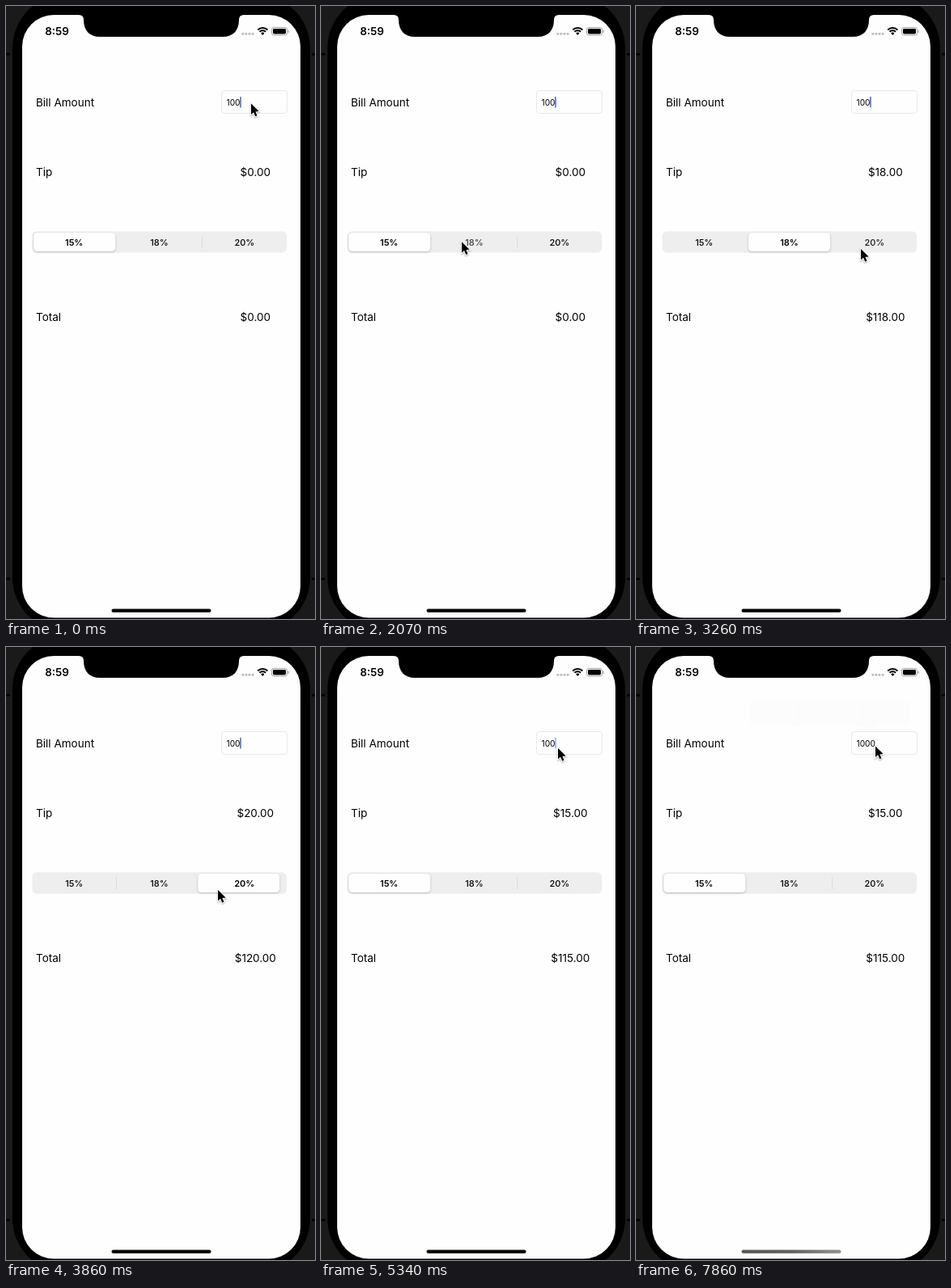
These frames come from a looping animation (382x757 px, 8000 ms). An HTML page with a canvas:

```html
<!DOCTYPE html>
<html lang="en">
<head>
<meta charset="utf-8">
<title>Tip calculator</title>
<style>
  html, body { margin: 0; width: 100%; height: 100%; overflow: hidden; background: #000; }
  canvas { display: block; width: 382px; height: 757px; }
</style>
</head>
<body>
<canvas id="stage"></canvas>
<script>
const W = 382, H = 757, LOOP = 8000, STEP = 148.3;
const PAPER = '#fefefe';
const canvas = document.getElementById('stage');
const ctx = canvas.getContext('2d');
const dpr = window.devicePixelRatio || 1;
canvas.width = W * dpr;
canvas.height = H * dpr;

// Pointer tip: step, x, y
const POINTER = [
  [2, 303, 120.5], [4, 286, 145], [6, 235, 205], [8, 184, 258], [10, 165.5, 274.5],
  [12, 173, 290], [14, 175, 292.5], [16, 178, 293], [18, 215, 297], [20, 271, 300],
  [22, 285, 300], [24, 284, 300], [26, 262, 300], [28, 162, 296], [30, 104, 292],
  [31, 101, 292], [32, 104, 291], [33, 130, 268], [34, 205, 178], [35, 281, 94.5],
  [36, 293, 125], [38, 294, 124], [41, 296, 122.5]
];
// Segment taps: release step, chosen segment
const TAPS = [[14, 1], [23, 2], [31, 0]];
// Label dimming while pressed: segment, centre step, depth
const PRESSES = [[1, 14, 0.5], [2, 22.6, 0.55], [0, 30.6, 0.5]];
const SEGMENTS = ['15%', '18%', '20%'];
const RATES = [15, 18, 20];
const TYPED_AT = 48, MENU_AT = 42;

const lerp = (a, b, u) => a + (b - a) * u;
const clamp01 = v => Math.max(0, Math.min(1, v));
const mod = (a, b) => ((a % b) + b) % b;

function pointerAt(n) {
  const i = POINTER.findIndex(k => k[0] >= n);
  if (i === 0) return POINTER[0].slice(1);
  if (i < 0) return POINTER[POINTER.length - 1].slice(1);
  const a = POINTER[i - 1], b = POINTER[i];
  const u = (n - a[0]) / (b[0] - a[0]);
  return [lerp(a[1], b[1], u), lerp(a[2], b[2], u)];
}

function thumbAt(n) {
  let pos = 0;
  for (const [at, seg] of TAPS) {
    const u = clamp01((n - at) / 4);
    pos = lerp(pos, seg, 1 - (1 - u) ** 2);
  }
  return pos;
}

function caretAlpha(n) {
  if (n >= TYPED_AT) return n < 52 ? 1 : n < 53 ? 0.5 : 0;
  const phase = mod(n - 2.6, 6.67);
  return phase < 1 ? 0.55 : phase < 3 ? 0 : 1;
}

function menuAlpha(n) {
  if (n < MENU_AT) return 0;
  if (n < TYPED_AT) return 1;
  return n < TYPED_AT + 1 ? 0.5 : 0.008;
}

function box(x, y, w, h, r, fill) {
  ctx.beginPath();
  ctx.roundRect(x, y, w, h, r);
  ctx.fillStyle = fill;
  ctx.fill();
}

function text(str, x, y, size, { weight = 400, align = 'left', color = '#000' } = {}) {
  ctx.font = `${weight} ${size}px Inter, "Liberation Sans", sans-serif`;
  ctx.textAlign = align;
  ctx.fillStyle = color;
  ctx.fillText(str, x, y);
}

function drawPhone() {
  ctx.fillStyle = '#1a1a1a';
  ctx.fillRect(0, 0, W, H);
  ctx.fillStyle = '#050505';
  ctx.fillRect(0, 58, 5, 3);
  ctx.fillRect(0, 706, 5, 3);
  ctx.fillRect(378, 58, 4, 3);
  ctx.fillRect(378, 706, 4, 3);
  box(8, -14, 368, 786, 66, '#000');
  box(20, 11, 344, 744.5, 39, PAPER);

  // Notch with flared shoulders
  ctx.beginPath();
  ctx.moveTo(90, 10);
  ctx.lineTo(90, 11);
  ctx.quadraticCurveTo(96, 11, 96, 17);
  ctx.bezierCurveTo(96, 30, 103, 38, 116, 38);
  ctx.lineTo(268, 38);
  ctx.bezierCurveTo(281, 38, 288, 30, 288, 17);
  ctx.quadraticCurveTo(288, 11, 294, 11);
  ctx.lineTo(294, 10);
  ctx.fillStyle = '#000';
  ctx.fill();
}

function drawStatus() {
  text('8:59', 63, 36, 13.4, { weight: 600, align: 'center' });
  for (let i = 0; i < 4; i++) box(291.3 + i * 4.1, 33, 3, 2.8, 1, '#bbb');

  ctx.strokeStyle = '#000';
  ctx.lineWidth = 1.9;
  for (const r of [8.6, 5.4]) {
    ctx.beginPath();
    ctx.arc(317.3, 35.6, r, -Math.PI * 0.75, -Math.PI * 0.25);
    ctx.stroke();
  }
  ctx.beginPath();
  ctx.moveTo(317.3, 36);
  ctx.arc(317.3, 35.8, 3, -Math.PI * 0.75, -Math.PI * 0.25);
  ctx.fillStyle = '#000';
  ctx.fill();

  ctx.beginPath();
  ctx.roundRect(328.5, 26.5, 19, 9.5, 2.6);
  ctx.strokeStyle = '#999';
  ctx.lineWidth = 0.9;
  ctx.stroke();
  box(330, 28, 16, 6.5, 1.4, '#000');
  box(348.6, 29.6, 1.3, 3.4, 0.6, '#aaa');
}

function drawForm(n) {
  const tap = TAPS.filter(t => n >= t[0]).pop();
  const tip = tap ? RATES[tap[1]] : 0;
  const total = tap ? 100 + tip : 0;
  const money = v => '$' + v.toFixed(2);

  [['Bill Amount', 124], ['Tip', 210], ['Total', 388.5]]
    .forEach(([label, y]) => text(label, 37, y, 13.5));
  text(money(tip), 308.3, 210, 13.5, { align: 'center' });
  text(money(total), 308.3, 388.5, 13.5, { align: 'center' });

  ctx.beginPath();
  ctx.roundRect(266.5, 104.5, 81, 28, 3.5);
  ctx.strokeStyle = '#e9e9e9';
  ctx.lineWidth = 1;
  ctx.stroke();
  const typed = n >= TYPED_AT;
  text(typed ? '1000' : '100', 272.5, 122.6, 10.2);
  ctx.globalAlpha = caretAlpha(n);
  box(typed ? 295.4 : 289.2, 112, 1.5, 13.5, 0.5, '#4560d0');
  ctx.globalAlpha = 1;
}

function drawSegments(n) {
  const pos = thumbAt(n), selected = Math.round(pos);
  box(32.5, 278.3, 314.7, 26.4, 6, '#eeeeee');
  for (const i of [0, 1]) {
    if (selected === i || selected === i + 1) continue;
    ctx.fillStyle = '#dadada';
    ctx.fillRect(136 + i * 106, 284, 1, 15);
  }

  ctx.save();
  ctx.shadowColor = 'rgba(0,0,0,.22)';
  ctx.shadowBlur = 3 * dpr;
  ctx.shadowOffsetY = 1 * dpr;
  box(34.2 + pos * 104.8, 280, 101, 23, 4.5, PAPER);
  ctx.restore();

  SEGMENTS.forEach((label, i) => {
    const [, centre, depth] = PRESSES.find(p => p[0] === i);
    ctx.globalAlpha = 1 - depth * clamp01(1 - Math.abs(n - centre) / 2);
    text(label, 84.2 + i * 105.3, 295.6, 11, { weight: i === selected ? 600 : 500, align: 'center' });
  });
  ctx.globalAlpha = 1;
}

function drawMenu(n) {
  const alpha = menuAlpha(n);
  if (!alpha) return;
  ctx.globalAlpha = alpha;
  box(139.5, 67, 199.5, 30, 7, '#040404');
  ctx.beginPath();
  ctx.moveTo(281, 96.5);
  ctx.lineTo(289.5, 104.5);
  ctx.lineTo(298, 96.5);
  ctx.fill();
  ctx.fillStyle = '#444';
  ctx.fillRect(201, 67, 1, 30);
  ctx.fillRect(280, 67, 1, 30);
  [['Select', 171], ['Select All', 242], ['Paste', 310]]
    .forEach(([label, x]) => text(label, x, 86.2, 11.4, { align: 'center', color: '#f0f0f0' }));
  ctx.globalAlpha = 1;
}

function drawHomeBar(n) {
  let fill = '#000';
  if (n >= 38) {
    fill = ctx.createLinearGradient(131, 0, 253, 0);
    fill.addColorStop(0, '#555');
    fill.addColorStop(0.5, '#606060');
    fill.addColorStop(1, '#909090');
  }
  box(130.5, 744.5, 123, 4.3, 2.1, fill);
}

function drawPointer(n) {
  const [x, y] = pointerAt(n);
  ctx.save();
  ctx.translate(x, y);
  ctx.beginPath();
  ctx.moveTo(0, 0);
  ctx.lineTo(0, 13.6);
  ctx.lineTo(3.1, 10.8);
  ctx.lineTo(5.2, 15.8);
  ctx.lineTo(7.5, 14.8);
  ctx.lineTo(5.4, 9.9);
  ctx.lineTo(9.6, 9.6);
  ctx.closePath();
  ctx.shadowColor = 'rgba(0,0,0,.35)';
  ctx.shadowBlur = 2 * dpr;
  ctx.shadowOffsetY = 1 * dpr;
  ctx.strokeStyle = '#fff';
  ctx.lineWidth = 1.8;
  ctx.stroke();
  ctx.shadowColor = 'transparent';
  ctx.fillStyle = '#000';
  ctx.fill();
  ctx.restore();
}

function frame() {
  const n = Math.floor((performance.now() % LOOP) / STEP);
  ctx.setTransform(dpr, 0, 0, dpr, 0, 0);
  drawPhone();
  drawStatus();
  drawForm(n);
  drawSegments(n);
  drawMenu(n);
  drawHomeBar(n);
  drawPointer(n);
  requestAnimationFrame(frame);
}
frame();
</script>
</body>
</html>
```
